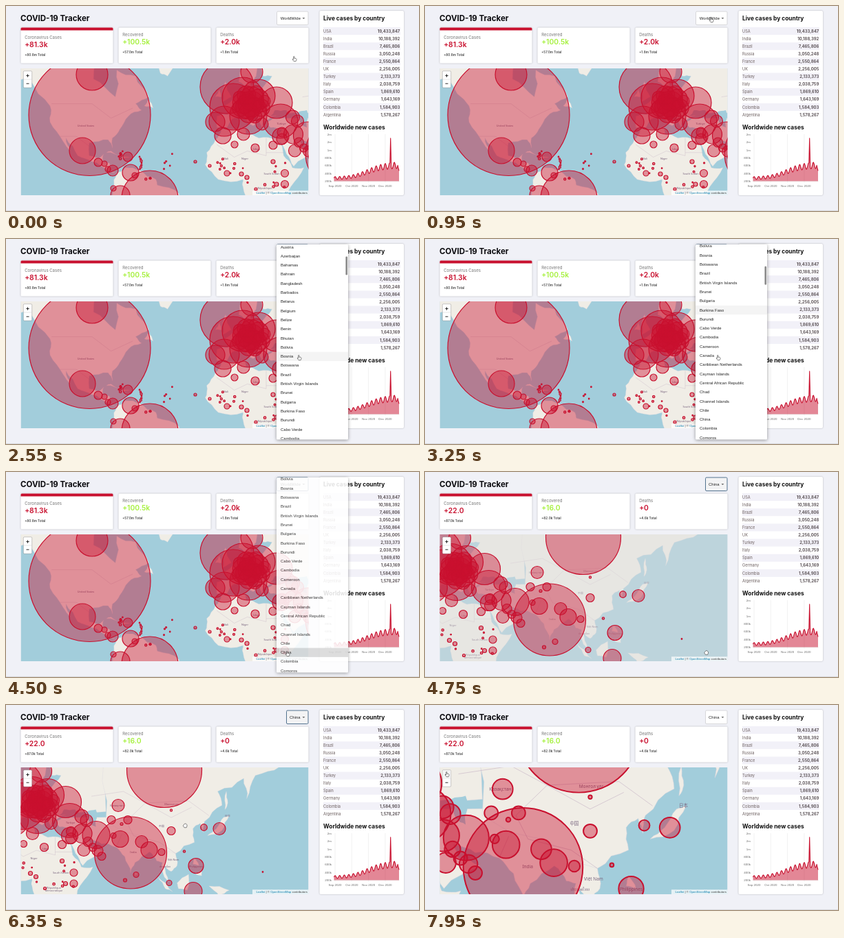
An HTML page for the animation above (8000 ms loop, 600x299 px).

```html
<!DOCTYPE html>
<html lang="en">
<head>
<meta charset="utf-8">
<title>COVID-19 Tracker</title>
<style>
html, body { margin: 0; width: 100%; height: 100%; overflow: hidden; background: #f0f1f7; }
svg { display: block; width: 100vw; height: 100vh; }
text { font-family: Inter, sans-serif; }
.ui { font-family: "Liberation Sans", Arial, sans-serif; letter-spacing: .00938em; }
.place { font-family: "Noto Sans", "Noto Sans CJK SC", "Noto Sans CJK JP", sans-serif; font-size: 3.9px; fill: #77637d; text-anchor: middle; }
.card { fill: #fff; filter: drop-shadow(0 .5px .8px rgba(0,0,0,.25)); }
</style>
</head>
<body>
<svg id="stage" viewBox="0 0 600 299"></svg>
<script>
const LOOP = 8000, RED = '#c8102e', SEA = '#a2cddb', NS = 'http://www.w3.org/2000/svg';
const stage = document.getElementById('stage');

function el(tag, attrs, parent = stage, text) {
  const node = document.createElementNS(NS, tag);
  for (const k in attrs) node.setAttribute(k, attrs[k]);
  if (text !== undefined) node.textContent = text;
  return parent.appendChild(node);
}
const set = (node, attrs) => { for (const k in attrs) node.setAttribute(k, attrs[k]); };
const rect = (x, y, width, height, more, parent) => el('rect', { x, y, width, height, ...more }, parent);
const label = (x, y, size, text, more, parent) => el('text', { x, y, 'font-size': size, ...more }, parent, text);
const clip = (id, x, y, w, h) => rect(x, y, w, h, {}, el('clipPath', { id }));
let seed = 7;
const rnd = () => (seed = seed * 16807 % 2147483647) / 2147483647;

rect(0, 0, 600, 299, { fill: '#f0f1f7' });
rect(0, 298, 600, 1, { fill: '#d9dade' });
label(21, 22, 11.5, 'COVID-19 Tracker', { 'font-weight': 700, fill: '#0b0b0f' });

// Statistic cards
const cards = [
  [21.5, 4, 'Coronavirus Cases', RED, ['+81.3k', '+22.0'], ['+80.8m Total', '+87.0k Total']],
  [163.5, 0, 'Recovered', '#a5f03c', ['+100.5k', '+16.0'], ['+57.0m Total', '+82.0k Total']],
  [305.5, 0, 'Deaths', RED, ['+2.0k', '+0'], ['+1.8m Total', '+4.6k Total']]
].map(([x, dy, name, fill, count, total]) => {
  rect(x, 31.5, 134, 52, { class: 'card', rx: 1.5 });
  if (dy) el('path', { d: `M${x} 35.4v-2.4q0-1.5 1.5-1.5h131q1.5 0 1.5 1.5v2.4z`, fill: RED });
  label(x + 5.7, 43.5 + dy, 6, name, { fill: '#757575' });
  return {
    count, total,
    big: label(x + 5.7, 56 + dy, 10.3, '', { fill, 'font-weight': 600 }),
    small: label(x + 5.7, 69 + dy, 4.7, '', { fill: '#444', 'font-weight': 600 })
  };
});

// Country selector
const box = rect(393.5, 8, 46, 19.5, { fill: '#fff', rx: 1.5 });
const choice = label(398.8, 19.6, 5.9, '', { class: 'ui', fill: '#222' });
el('path', { d: 'M430.5 17h3.8l-1.9 2z', fill: '#666' });

// Map, Web Mercator
clip('mapClip', 21.5, 91, 418, 185);
const map = el('g', { 'clip-path': 'url(#mapClip)' });
rect(21.5, 91, 418, 185, { fill: SEA }, map);
const world = el('g', {}, map);

function project(lon, lat) {
  return [325.3 + 2.107 * lon, 183 - 120.7 * (Math.log(Math.tan(Math.PI / 4 + lat * Math.PI / 360)) - .6487)];
}
function points(list) {
  const out = [];
  for (let i = 0; i < list.length; i += 2) out.push(project(list[i], list[i + 1]));
  return out;
}
const path = pts => 'M' + pts.map(p => p[0].toFixed(1) + ' ' + p[1].toFixed(1)).join('L');

// Midpoint displacement turns a coarse outline into a coast
function roughen(pts) {
  return pts.flatMap((a, i) => {
    const b = pts[(i + 1) % pts.length], k = (rnd() - .5) * .22;
    return [a, [(a[0] + b[0]) / 2 + (b[1] - a[1]) * k, (a[1] + b[1]) / 2 - (b[0] - a[0]) * k]];
  });
}
const coast = list => path(roughen(roughen(points(list)))) + 'Z';
const land = (...list) => el('path', { d: coast(list), fill: '#f0ede6', stroke: '#d5d3dc', 'stroke-width': .3 }, world);
const lake = (...list) => el('path', { d: coast(list), fill: SEA }, world);
const border = (...list) => el('path', { d: path(points(list)), fill: 'none', stroke: '#b59cb8', 'stroke-width': .45, opacity: .6 }, world);

// The Americas
land(-168,70, -165,61, -152,59, -138,59, -124,48, -124,40, -115,29, -110,23, -113,31, -105,20, -95,16, -84,10, -78,8, -83,10, -83,15, -88,16, -87,21, -91,18, -97,20, -97,28, -84,30, -81,25, -81,31, -76,36, -70,43, -61,46, -65,49, -56,52, -65,60, -78,62, -79,52, -94,59, -90,70);
land(-54,70, -48,61, -43,60, -34,70);
land(-59,48, -56,51, -53,47);
land(-85,22, -75,20, -82,23);
land(-74,20, -69,19, -74,18);
land(-78,8, -72,12, -62,10, -51,4, -50,0, -35,-6, -35,-14, -80,-14, -80,-1);
// Africa
land(-6,36, 10,37, 11,33, 20,31, 33,31, 37,20, 43,12, 51,12, 42,-1, 40,-14, 13,-14, 9,-1, 9,4, -8,4, -17,14, -16,22, -10,30);
// Europe
land(-9,37, -2,37, 3,42, 9,44, 16,38, 18,40, 12,45, 19,42, 23,36, 23,40, 30,43, 60,45, 62,70, 28,71, 10,64, 6,58, 14,56, 18,60, 22,65, 23,60, 29,60, 21,55, 10,57, 8,54, -4,48, -1,44, -9,43);
land(-5,50, 1,52, -3,58, -5,55);
land(-10,52, -6,52, -7,55);
land(-22,64, -14,65, -22,66);
// Asia
land(26,40, 28,37, 36,36, 33,30, 39,21, 44,13, 59,22, 50,25, 48,30, 57,27, 67,25, 73,19, 77,8, 80,15, 90,22, 95,16, 99,15, 99,9, 103,2, 100,13, 105,9, 109,13, 108,21, 100,45, 30,42);
land(60,40, 108,21, 121,28, 120,36, 125,39, 127,34, 128,40, 140,48, 137,54, 155,59, 157,51, 163,60, 180,63, 188,70, 55,70);
land(130,32, 136,36, 141,42, 145,43, 140,35);
land(142,46, 143,54, 144,49);
land(96,5, 106,-5, 101,-3);
land(109,1, 117,7, 116,-4, 110,-3);
land(120,14, 121,18, 124,13);
land(122,7, 126,10, 126,6);
land(131,-1, 145,-4, 138,-8);
land(80,9, 82,7, 80,6);
lake(28,43, 31,46, 39,46, 41,42);
lake(47,45, 53,46, 53,37, 49,39);
// Main borders
border(-123,49, -95,49, -82,42, -67,47);
border(-117,32, -106,32, -97,26);
border(-9,27, 3,19, 12,23, 25,20, 25,31);
border(25,22, 37,22);
border(50,52, 72,54, 87,49, 117,50, 131,43);
border(87,49, 105,42, 119,47);
border(87,49, 74,40, 79,32, 97,28, 108,21);
border(67,25, 71,33);

const EAST = 306.5;
const place = (x, y, name) => el('text', { class: 'place', x, y }, world, name);
place(116, 176, 'United States');
place(364, 210, 'Libya');
place(319, 224, 'Mali');
place(347, 224, 'Niger');
place(386, 245.5, 'South Sudan');
place(376, 267, 'République');
place(376, 271.5, 'démocratique');
place(400, 172.5, 'Türkiye');
place(EAST + 161, 147.5, 'Қазақстан');
place(EAST + 241, 145, 'Монгол улс');
place(EAST + 226, 177.5, '中国');
place(EAST + 185, 215.5, 'India');
place(EAST + 322, 162, '日本');
place(EAST + 276, 236, 'Philippines');
place(EAST + 243, 226.5, 'Việt Nam');
place(EAST + 231, 236, 'ประเทศไทย');

const haze = rect(21.5, 91, 418, 185, { fill: '#ddd' }, map);
const bubbles = el('g', { fill: RED, 'fill-opacity': .42, stroke: RED, 'stroke-width': 1.2 }, map);
const bubble = (cx, cy, r) => el('circle', { cx, cy, r }, bubbles);
// Triples of x, y and radius
function region(dx, ...list) {
  for (let i = 0; i < list.length; i += 3) bubble(list[i] + dx, list[i + 1], list[i + 2]);
}
function scatter(count, x, y, w, h, small, large) {
  for (let i = 0; i < count; i++) bubble(x + rnd() * w, y + rnd() * h, small + rnd() * (large - small));
}
region(0, 121.5,159,88.5, 125,100,23, 111,211,19, 209,281,41, 181,243,12, 166,276,14, 156,266,4, 134,228,6, 143,230,4, 155,240,8, 148,238,4, 177,220,7, 187,247,4);
scatter(7, 157, 207, 13, 16, .8, 2);
for (let i = 0; i < 7; i++) bubble(194 + 3 * Math.sin(i / 2), 220 + i * 3, .8 + i % 3 * .4);
scatter(3, 203, 249, 10, 4, 1.2, 1.8);
region(0, 321,118,39, 330,147,34, 317,168,22, 304,169,14, 352,160,27, 344,134,30, 367,131,24, 393,141,23, 357,96,16, 399,168,25, 372,172,9, 399,190,12, 401,194,8, 401,184,7);
// Central Europe
for (let i = 0; i < 14; i++) {
  const a = i * 2.4, d = Math.sqrt(i) * 5.5;
  bubble(356 + d * Math.cos(a), 143 + d * Math.sin(a), 19 - i * .8);
}
region(0, 315,189,12, 345,187,9, 362,207,6, 388,203,6, 332,202,5, 342,245,3, 321,244,4, 405,244,5.5, 405,260,5.5, 393,260,3, 388,227,3, 350,250,3, 296,233,2, 275,227,2, 363,267,2);
scatter(9, 301, 222, 32, 26, .8, 2);
scatter(9, 340, 224, 78, 44, .8, 1.8);
region(EAST, 230,94.5,54.5, 181,215,52.5, 131,189,20, 111,187,14, 113,211,9, 133,212,8, 119,199,7, 126,207,6, 139,220,6, 166,195,12, 208,211,12, 197,199,9, 226,214,5, 163,146,9, 153,167,6, 177,167,6, 168,173,2, 156,190,4, 110,162,10, 117,168,9, 240,183,6, 287.5,178,4.8, 310,180,9, 276,234,11, 259,213,1.7, 237,259,4, 272,271,13, 189,247,4, 240,153,1.6, 173,255,2.5, 373,243,.8);
scatter(5, 229, 214, 13, 24, .8, 1.1);

rect(25.3, 94.8, 12.4, 24.4, { fill: '#fff', stroke: 'rgba(0,0,0,.25)', 'stroke-width': .8, rx: 1.5 });
el('path', { d: 'M25.5 107h12', stroke: '#ccc', 'stroke-width': .5 });
const plusKey = rect(25.8, 95.3, 11.4, 11.4, { fill: '#f4f4f4' });
el('path', { d: 'M29.3 101.6h4.4M31.5 99.4v4.4M29.5 113.2h4', stroke: '#111', 'stroke-width': .9 });
rect(358, 269.3, 81.5, 6.7, { fill: '#fff', opacity: .72 });
const credit = label(437.8, 274, 4.2, '', { class: 'ui', 'text-anchor': 'end', fill: '#333' });
[['Leaflet', '#0078a8'], [' | © ', '#333'], ['OpenStreetMap', '#0078a8'], [' contributors', '#333']]
  .forEach(([s, fill]) => el('tspan', { fill }, credit, s));

// Country table
rect(455.5, 7, 122.5, 269, { class: 'card', rx: 2 });
const heading = { 'font-weight': 700, fill: '#111' };
label(461, 21, 8.4, 'Live cases by country', heading);
[['USA', '19,433,847'], ['India', '10,188,392'], ['Brazil', '7,465,806'], ['Russia', '3,050,248'], ['France', '2,550,864'], ['UK', '2,256,005'],
 ['Turkey', '2,133,373'], ['Italy', '2,038,759'], ['Spain', '1,869,610'], ['Germany', '1,643,169'], ['Colombia', '1,584,903'], ['Argentina', '1,578,267']
].forEach(([name, cases], i) => {
  const y = 36.5 + i * 11.09;
  if (i % 2 === 0) rect(461, y - 5.5, 112, 11.1, { fill: '#f2f1f8' });
  label(461, y + 2.1, 5.6, name, { fill: '#6a5d5d' });
  label(572.3, y + 2.1, 5.9, cases, { fill: '#5d5458', 'font-weight': 700, 'text-anchor': 'end' });
});

// Daily chart
label(461, 180, 8.4, 'Worldwide new cases', heading);
const tick = { class: 'ui', fill: '#666' };
['2m', '2m', '1m', '800k', '600k', '400k', '200k'].forEach((s, i) => label(473, 189 + i * 11.3, 4.4, s, { ...tick, 'text-anchor': 'end' }));
['Sep', 'Oct', 'Nov', 'Dec'].forEach((m, i) => {
  const x = 478 + i * 24.3;
  el('path', { d: `M${x} 187v71`, stroke: '#e2e2e2', 'stroke-width': .5 });
  label(x, 263.5, 4.4, m + ' 2020', { ...tick, 'text-anchor': 'middle' });
});
el('path', { d: 'M476 255.6h95.5', stroke: '#ddd', 'stroke-width': .5 });
const daily = Array.from({ length: 101 }, (_, i) => {
  const trend = 275 + 345 / (1 + Math.exp((52 - i) / 13));
  const v = i === 87 ? 1310 : i > 98 ? 470 + (100 - i) * 60 : trend * (1 + .14 * Math.sin(i * Math.PI * 2 / 7));
  return `${(476.5 + i * .945).toFixed(1)} ${(255.6 - (v - 200) * .0565).toFixed(1)}`;
}).join('L');
el('path', { d: `M476.5 255.6L${daily}V255.6z`, fill: RED, opacity: .5 });
el('path', { d: 'M' + daily, fill: 'none', stroke: RED, 'stroke-width': 1.1, 'stroke-linejoin': 'round' });

// Drop-down menu
const PITCH = 13.3, TOP = 11, CHINA = 42;
const countries = 'WorldWide,Afghanistan,Albania,Algeria,Andorra,Angola,Anguilla,Antigua and Barbuda,Argentina,Armenia,Aruba,Australia,Austria,Azerbaijan,Bahamas,Bahrain,Bangladesh,Barbados,Belarus,Belgium,Belize,Benin,Bhutan,Bolivia,Bosnia,Botswana,Brazil,British Virgin Islands,Brunei,Bulgaria,Burkina Faso,Burundi,Cabo Verde,Cambodia,Cameroon,Canada,Caribbean Netherlands,Cayman Islands,Central African Republic,Chad,Channel Islands,Chile,China,Colombia,Comoros,Congo'.split(',');
clip('menuClip', 393, 8, 104, 284.5);
const menu = el('g', {});
rect(393, 8, 104, 284.5, { fill: '#fff', rx: 1.5, style: 'filter:drop-shadow(0 1.5px 2.5px rgba(0,0,0,.4))' }, menu);
const items = el('g', {}, el('g', { 'clip-path': 'url(#menuClip)' }, menu));
rect(393, TOP, 104, PITCH, { fill: '#e8e8e8' }, items);
const hover = rect(393, TOP, 104, PITCH, {}, items);
countries.forEach((name, i) => label(399, TOP + i * PITCH + 8.5, 5.9, name, { class: 'ui', fill: '#222' }, items));
const thumb = rect(493.4, 8, 2.7, 27, { rx: 1.3, fill: '#8c8c8c' }, menu);

// Pointer
const cursor = el('g', { fill: '#fff', stroke: '#222', 'stroke-width': .55, 'stroke-linejoin': 'round' });
const finger = el('path', { d: 'M-1.3-3.2q.7-.9 1.2 0v2.4q2.8-.2 3.1 1.2 .1 2-.9 3.3h-2.9q-1-1.5-2.2-2.8 .4-1.1 1.7 0z' }, cursor);
const grab = el('path', { d: 'M-2.6-.8l1.7-2 1.8.1 1.5 1.4v2.2l-.8 2h-3.1l-1.7-2.5z' }, cursor);

const ramp = (t, a, b) => Math.max(0, Math.min(1, (t - a) / (b - a)));
const smooth = v => v * v * (3 - 2 * v);
const route = [[0, 419, 77], [350, 419, 77], [850, 416, 20], [1150, 416, 20], [1550, 426, 173], [3450, 426, 173], [4150, 409, 265],
  [4600, 409, 265], [4800, 409, 263], [5950, 409, 263], [6350, 261, 176], [6850, 29, 124], [7050, 32, 101], [LOOP, 32, 101]];
function pointerAt(t) {
  const i = route.findIndex((k, n) => n && t <= k[0]);
  const a = route[i - 1], b = route[i], p = ramp(t, a[0], b[0]);
  return [a[1] + (b[1] - a[1]) * p, a[2] + (b[2] - a[2]) * p];
}
// cubic-bezier(0, 0, .25, 1) solved by bisection
function zoomEase(x) {
  let lo = 0, hi = 1;
  for (let i = 0; i < 20; i++) {
    const u = (lo + hi) / 2;
    if (.75 * (1 - u) * u * u + u * u * u < x) lo = u; else hi = u;
  }
  return 3 * (1 - lo) * lo * lo + lo * lo * lo;
}

function draw(t) {
  const china = t >= 4700, k = +china;
  const [x, y] = pointerAt(t);

  for (const c of cards) { c.big.textContent = c.count[k]; c.small.textContent = c.total[k]; }
  choice.textContent = china ? 'China' : 'WorldWide';
  choice.setAttribute('x', china ? 412 : 398.8);
  const focus = t >= 1000 && t < 7800;
  set(box, { x: china ? 407.5 : 393.5, width: china ? 31.5 : 45.5, fill: focus ? '#f3f3f4' : '#fff', stroke: focus ? '#52728f' : '#c9c9cc', 'stroke-width': focus ? 1 : .7 });

  const scale = 1 + zoomEase(ramp(t, 7869, 8119));
  const view = china ? `translate(240 183) scale(${scale}) translate(${-240 - EAST} -182.5)` : '';
  set(world, { transform: view });
  set(bubbles, { transform: view });
  haze.setAttribute('opacity', china ? .5 * (1 - ramp(t, 4700, 5300)) : 0);
  plusKey.setAttribute('opacity', +(t > 7000));

  const shown = ramp(t, 1000, 1120) * (1 - ramp(t, 4480, 4650));
  const scroll = 313 * smooth(ramp(t, 1850, 3200));
  const held = t < 3450 ? Math.min(scroll, 247) : scroll;
  const picked = t > 4350;
  const row = picked ? CHINA : Math.floor((y - TOP + held) / PITCH);
  set(menu, { opacity: shown, visibility: shown ? 'visible' : 'hidden' });
  items.setAttribute('transform', `translate(0 ${-scroll})`);
  set(hover, { y: TOP + row * PITCH, fill: picked ? '#d9d9d9' : '#f4f4f4', opacity: row > 0 ? 1 : 0 });
  set(thumb, { y: 9.5 + scroll * .0966, opacity: ramp(t, 1850, 1950) * (1 - ramp(t, 3500, 3750)) });

  const onMap = china && t < 6850;
  cursor.setAttribute('transform', `translate(${x} ${y})`);
  finger.setAttribute('visibility', onMap ? 'hidden' : 'visible');
  grab.setAttribute('visibility', onMap ? 'visible' : 'hidden');
}

function frame() {
  draw(performance.now() % LOOP);
  requestAnimationFrame(frame);
}
frame();
</script>
</body>
</html>
```
